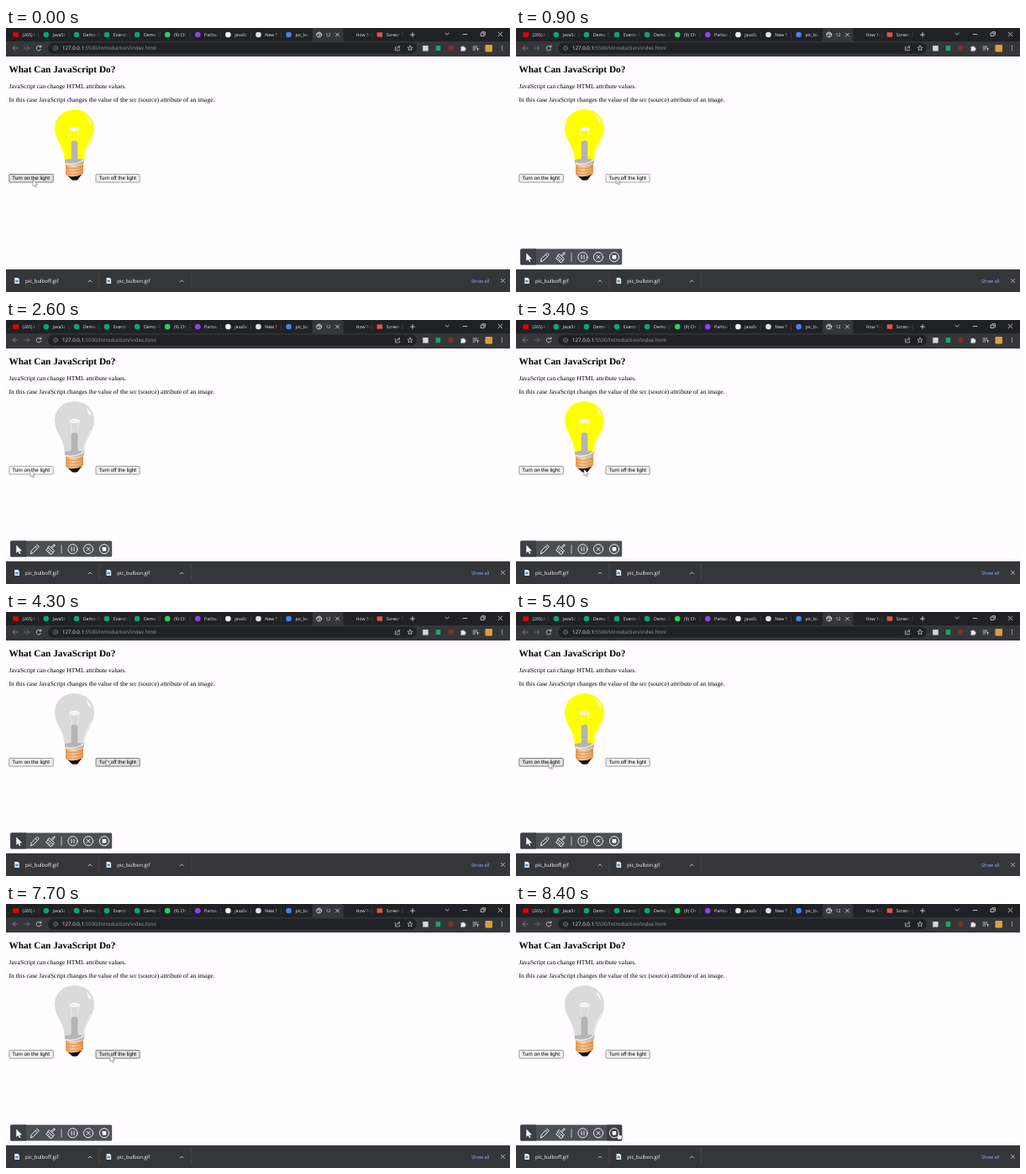
Recreate the animation shown at these times as an HTML page. Size 600 by 315 pixels, loop 8500 ms.

```html
<!DOCTYPE html>
<html lang="en">
<head>
<meta charset="utf-8">
<title>Light switch demo</title>
<style>
html, body { margin: 0; width: 100%; height: 100%; overflow: hidden; background: #fffdff; }
svg { display: block; width: 100vw; height: 100vh; text-rendering: geometricPrecision; }
.ui { font-family: "Open Sans", sans-serif; fill: #e8eaed; }
.serif { font-family: "Liberation Serif", serif; fill: #000; }
.btn { font-family: "Liberation Sans", sans-serif; font-size: 6.22px; fill: #000; }
.line { fill: none; stroke: #dfe1e5; stroke-width: .8; stroke-linecap: round; stroke-linejoin: round; }
</style>
</head>
<body>
<svg id="stage" viewBox="0 0 600 315" preserveAspectRatio="none">
  <defs>
    <linearGradient id="fade"><stop offset="0" stop-color="#202124" stop-opacity="0"/><stop offset="1" stop-color="#202124"/></linearGradient>
    <linearGradient id="copper"><stop offset="0" stop-color="#eb9c58"/><stop offset=".4" stop-color="#ffc894"/><stop offset="1" stop-color="#e8994f"/></linearGradient>
  </defs>
  <rect width="600" height="315" fill="#fffdff"/>

  <rect width="600" height="17" fill="#202124"/>
  <g id="tabs"></g>
  <g class="line">
    <path d="M481.5 8h5M484 5.500v5M392.500 6l4 4m0-4l-4 4M523 6l2.200 2.200L527.400 6M544 7.500h5M565.500 6h3.500v3.500h-3.500zM566.800 4.700h3.600v3.600M586 5l4.800 4.800m0-4.800l-4.800 4.800"/>
  </g>

  <rect y="16" width="600" height="18" fill="#35363a"/>
  <rect x="50" y="17.500" width="439" height="13" rx="6.500" fill="#202124"/>
  <g class="line">
    <path d="M14 24H8m2.800-2.800L8 24l2.800 2.800" stroke="#8b8d91"/>
    <path d="M22 24h6m-2.800-2.800L28 24l-2.800 2.800" stroke="#77797d"/>
    <path d="M41.500 22.600a2.800 2.800 0 1 0 .2 2.500M41.900 20.800v2h-2"/>
    <circle cx="59" cy="24" r="2.500" stroke="#9aa0a6" stroke-width=".6"/>
    <path d="M59 23.800v1.400M59 22.700v.1" stroke="#9aa0a6" stroke-width=".6"/>
    <path d="M464 22.500h-.6v4.300h5.200v-1.600M465 25c.2-1.800 1.300-2.500 3.600-2.500M467.300 21l1.700 1.500-1.700 1.500" stroke-width=".65"/>
    <path d="M481 21l.9 2 2.200.2-1.700 1.400.6 2.200-2-1.200-2 1.200.6-2.200-1.700-1.400 2.200-.2z" stroke-width=".65"/>
    <path d="M556 22h5M556 24h5M556 26h2.500M561.500 24.500v2.300M561.500 24.500l1.300.5" stroke-width=".75"/>
  </g>
  <text class="ui" x="67" y="26.200" font-size="6.130">127.0.0.1<tspan fill="#9aa0a6">:5500/Introduction/index.html</tspan></text>
  <rect x="496.200" y="21" width="6.500" height="6.500" fill="#d5d7da"/>
  <rect x="511.700" y="21" width="5.500" height="6" fill="#16a765"/>
  <circle cx="529.500" cy="24" r="3.300" fill="#80302f"/>
  <path d="M541.300 22.400h1.700a1 1 0 1 1 2 0h1.600v1.600a1 1 0 1 1 0 2v1.400h-5.300v-1.600a1 1 0 0 0 0-1.900z" fill="#e8eaed"/>
  <rect x="570.500" y="20" width="8.500" height="8.500" rx="1" fill="#d9a13b"/>
  <g fill="#dfe1e5"><circle cx="590.500" cy="21.700" r=".65"/><circle cx="590.500" cy="24" r=".65"/><circle cx="590.500" cy="26.300" r=".65"/></g>

  <g class="serif" font-size="7.530">
    <text x="3.600" y="53" font-size="11.270" font-weight="bold">What Can JavaScript Do?</text>
    <text x="3.600" y="72">JavaScript can change HTML attribute values.</text>
    <text x="3.600" y="88">In this case JavaScript changes the value of the src (source) attribute of an image.</text>
  </g>

  <g id="bulb">
    <path id="glass" d="M81.500 97.500C95 97.500 104.700 107 104.700 120C104.700 132 96.800 138 94 150L92.500 160Q81.500 164.500 70.500 160L69 150C66.200 138 58.300 132 58.300 120C58.300 107 68 97.500 81.500 97.500Z" stroke-width=".4"/>
    <path d="M95.500 104.500Q100.500 108.500 101.300 115Q97.800 112.500 95.500 104.500Z" fill="#fff"/>
    <path d="M101.500 131.500Q94 141 92 156" fill="none" stroke="#fff" stroke-width=".7"/>
    <path id="wires" d="M76 121.500L79.300 138M87 121.500L83.700 138" fill="none" stroke-width=".6"/>
    <ellipse cx="81.600" cy="120.500" rx="6" ry="2.400" fill="#fff"/>
    <path d="M77 120.800q1.500-1.200 3 0t3 0t3 0" fill="none" stroke="#bbb" stroke-width=".5"/>
    <path d="M70.200 157.500Q76 156.500 78 156.500V136.500Q78 134.800 81.500 134.800Q85 134.800 85 136.500V156.500Q88 156 92.800 157.500L92.300 161.500Q81.500 165.500 70.700 161.500Z" fill="#b5b5b5" stroke="#a2a2a2" stroke-width=".4"/>
    <path d="M71.500 161.500Q84 164 92 157.500" fill="none" stroke="#f4f4f4" stroke-width="1.200"/>
    <path d="M71 162.800Q83 166.500 92 162V173Q90.500 176.500 87 177.500H76Q72.500 177 71 174.500Z" fill="url(#copper)"/>
    <path d="M71 166.500Q82 169.500 92 165M71 170Q82 173 92 168.500M71 173.500Q82 176.500 92 172" fill="none" stroke="#b3713a" stroke-width=".5"/>
    <path d="M73.500 176.500Q81.500 178.800 90 174.800L87.500 178L85.300 181.200Q81.500 182.400 78.500 181.200Z" fill="#17120f"/>
  </g>
  <rect id="onBox" x="3.800" y="174.500" width="52.500" height="9.600" rx="1" stroke-width=".7"/>
  <text class="btn" x="7.200" y="181.400">Turn on the light</text>
  <rect id="offBox" x="107" y="174.500" width="52.200" height="9.600" rx="1" stroke-width=".7"/>
  <text class="btn" x="110.500" y="181.400">Turn off the light</text>

  <g id="tools">
    <rect x="5.200" y="263.600" width="121" height="19" rx="1.500" fill="#4d4f57"/>
    <path d="M24 263.600H6.700Q5.200 263.600 5.200 265.100V281.100Q5.200 282.600 6.700 282.600H24Z" fill="#3c3e45"/>
    <rect id="stopCell" x="108" y="263.600" width="18.200" height="19" rx="1" fill="#3c3e45"/>
    <path d="M12.300 268.500V278L14.500 276L16 279.200L17.400 278.500L16 275.400H19Z" fill="#fff"/>
    <g class="line" style="stroke:#f4f4f4;stroke-width:1">
      <path d="M29.500 278.500l.7-3.200 6.300-6.300q1-.7 2 .3t.2 2l-6.300 6.300zM35.200 270.400l2.300 2.300"/>
      <path d="M54 271.300l3-3.300q1.200-.6 1.300.8l-3.300 3.500M51.700 269.800l6 5.700-1.700 1.700-6-5.700zM50 271.500q-.5 2.600-2.500 3l5.500 5.200q2.700-.5 3-2.500M49.500 276.400l1.700-1.500M51.300 278l1.600-1.500"/>
      <path d="M66 268.500v10" stroke-width=".7"/>
      <circle cx="79.500" cy="273.300" r="5.600"/><path d="M78 271.100v4.400M81 271.100v4.400"/>
      <circle cx="98" cy="273.300" r="5.600"/><path d="M96 271.300l4 4m0-4l-4 4"/>
      <circle cx="117" cy="273.300" r="5.600"/>
    </g>
    <rect x="114.700" y="271" width="4.600" height="4.600" fill="#fff"/>
  </g>

  <rect y="288" width="600" height="27" fill="#35363a"/>
  <g id="files"></g>
  <text class="ui" x="554" y="303.600" font-size="5.600" style="fill:#8ab4f8">Show all</text>
  <path class="line" d="M589.500 299.500l4 4m0-4l-4 4"/>

  <path id="arrow" d="M0 0V8L1.900 6.300L3.200 9.100L4.500 8.500L3.200 5.800H5.700Z" fill="#fff" stroke="#444" stroke-width=".45"/>
  <path id="hand" d="M-.8 .5Q0-.6.9.5V3.500L3.600 4.200Q4.500 4.500 4.300 5.500L3.500 9H-.5L-2.700 5.500Q-2.500 4.300-.8 5.500Z" fill="#fff" stroke="#222" stroke-width=".5"/>
</svg>
<script>
const $ = id => document.getElementById(id);
const LOOP = 8500, TICK = 100;

// title, icon colour, icon shape
const tabs = [
  ["(265) H", "#f00000", "box"], ["JavaSc", "#04aa6d"], ["Demo E", "#04aa6d"],
  ["Exercis", "#04aa6d"], ["Demo E", "#04aa6d"], ["(9) Ch", "#25d366"],
  ["Parlou", "#8a45f5"], ["javaSc", "#f2f2f2"], ["New T", "#dfe1e5"],
  ["pic_bu", "#4285f4"], ["12", "", "globe"], ["How To", "", "none"], ["Screen", "#e0554d", "box"]
];

function icon(x, color, shape) {
  if (shape === "none") return "";
  if (shape === "box") return `<rect x="${x - 3.3}" y="5.300" width="6.600" height="5.400" fill="${color}"/>`;
  if (shape === "globe") return `<g class="line" stroke-width=".6"><circle cx="${x}" cy="8" r="3"/><path d="M${x - 2.8} 7h2l1.500 1.500-1 2M${x + .5} 5.200l-.5 1.500 2.500 1"/></g>`;
  return `<circle cx="${x}" cy="8" r="3.300" fill="${color}"/>`;
}

$("tabs").innerHTML = tabs.map(([title, color, shape], i) => {
  const x = 11.7 + i * 36.1, active = shape === "globe";
  const back = active ? `<path d="M${x - 10} 17Q${x - 8} 17 ${x - 8} 15V2.500Q${x - 8} 0 ${x - 5.5} 0H${x + 26.5}Q${x + 29} 0 ${x + 29} 2.500V15Q${x + 29} 17 ${x + 31} 17Z" fill="#35363a"/>` : "";
  const end = active ? "" : `<rect x="${x + 19}" y="2" width="6.500" height="12" fill="url(#fade)"/><rect x="${x + 25.5}" y="2" width="4" height="12" fill="#202124"/>`;
  const split = active || i === 9 ? "" : `<path d="M${x + 27} 4.500v7" stroke="#55575c" stroke-width=".5"/>`;
  return `${back}${icon(x, color, shape)}<text class="ui" x="${x + 7.8}" y="9.900" font-size="5.270">${title}</text>${end}${split}`;
}).join("");

$("files").innerHTML = ["pic_bulboff.gif", "pic_bulbon.gif"].map((name, i) => {
  const x = i * 109.3;
  return `<path d="M${x + 10.3} 298h3.700l1.800 1.800v5.200h-5.500z" fill="#f1f3f4"/>
    <rect x="${x + 11.3}" y="300.700" width="3.300" height="2.800" fill="#4a8fd0"/>
    <text class="ui" x="${x + 23}" y="303.800" font-size="6" style="fill:#fff">${name}</text>
    <path class="line" d="M${x + 98} 303l2-2 2 2"/>
    <path d="M${x + 111} 292v20" stroke="#55575c" stroke-width=".6"/>`;
}).join("");

// first step, last step, end point
const start = [32, 181];
const moves = [
  [100, 700, 119, 178], [1500, 2300, 29, 179], [3000, 3800, 118, 177],
  [4000, 4100, 119, 176], [4600, 5200, 39, 179], [5700, 6400, 124, 176],
  [7700, 8400, 122, 272]
];
const presses = [[900, 1100], [2600, 2800], [4100, 4300], [5200, 5400], [6800, 7000]];
const switches = [1100, 2800, 4300, 5400, 7000];

function pointer(t) {
  let [x, y] = start;
  for (const [a, b, nx, ny] of moves) {
    if (t < a) break;
    const p = Math.min(1, (t - a + TICK) / (b - a + TICK));
    const e = p * p * (3 - 2 * p);
    x += (nx - x) * e;
    y += (ny - y) * e;
  }
  return [x, y];
}

function paint(id, fill, stroke) {
  $(id).setAttribute("fill", fill);
  $(id).setAttribute("stroke", stroke);
}

function paintButton(id, left, right, x, y, down) {
  const over = x >= left && x <= right && y >= 174 && y <= 184.5;
  if (!over) paint(id, "#efefef", "#767676");
  else if (down) paint(id, "#f5f5f5", "#8d8d8d");
  else paint(id, "#e1e1e2", "#4f4f4f");
}

const show = (id, on) => $(id).setAttribute("visibility", on ? "visible" : "hidden");

function draw(ms) {
  const t = Math.floor((ms % LOOP) / TICK) * TICK;
  const [x, y] = pointer(t);
  const down = presses.some(([a, b]) => t >= a && t < b);
  const lit = switches.filter(s => t >= s).length % 2 === 0;
  const onTools = y > 264;

  if (lit) paint("glass", "#ffff00", "#ffff00");
  else paint("glass", "#dadada", "#cfcfcf");
  paint("wires", "none", lit ? "#ffffa8" : "#f5f5f5");
  paintButton("onBox", 3.5, 56.5, x, y, down);
  paintButton("offBox", 106.7, 159.5, x, y, down);
  show("tools", t >= 100);
  show("stopCell", onTools);
  show("arrow", !onTools);
  show("hand", onTools);
  for (const id of ["arrow", "hand"]) $(id).setAttribute("transform", `translate(${x} ${y})`);
}

const begin = performance.now();
function tick() {
  draw(performance.now() - begin);
  requestAnimationFrame(tick);
}
tick();
</script>
</body>
</html>
```
